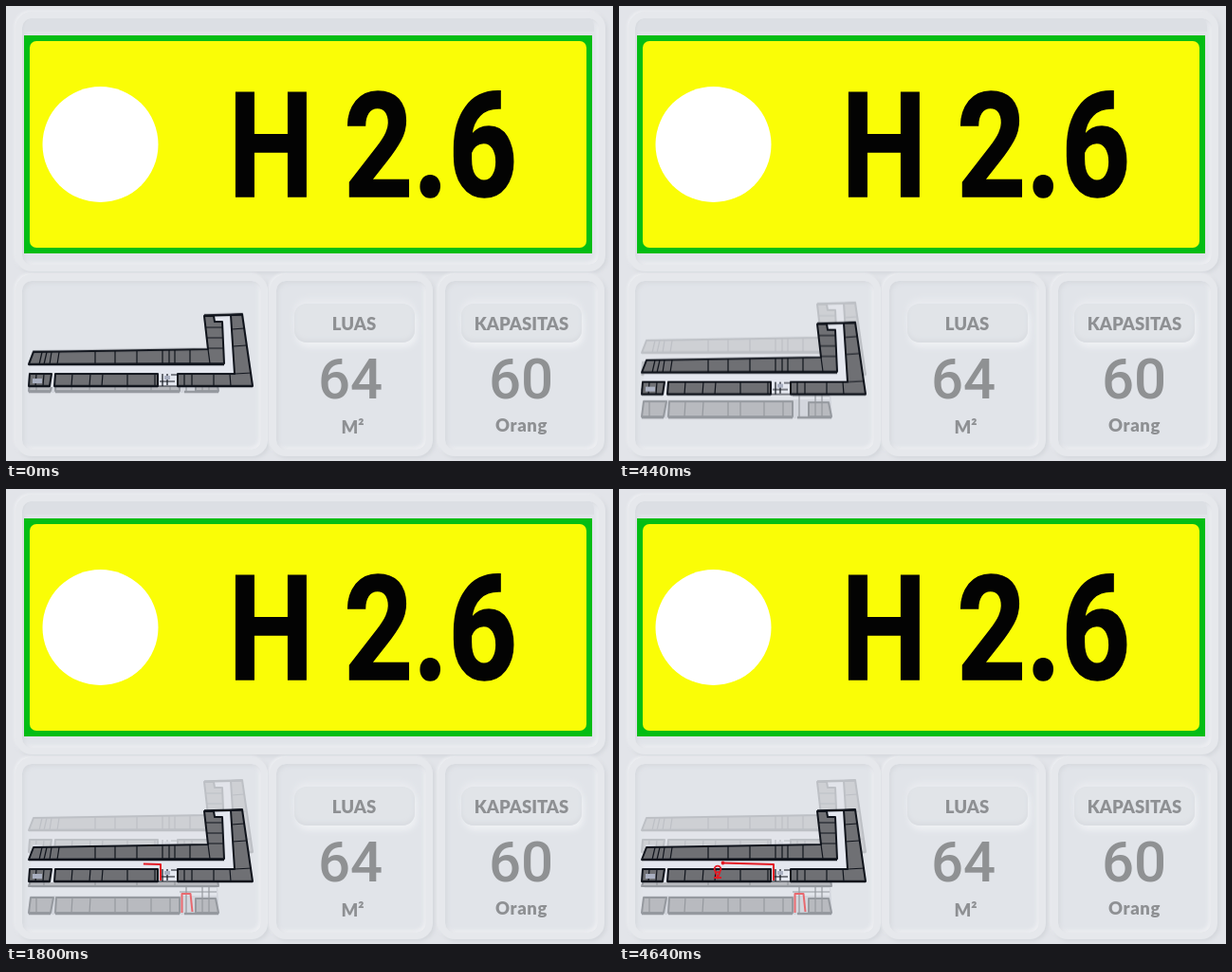
An HTML page for the animation above (5.12 s loop, 640 by 480 pixels).

```html
<!DOCTYPE html>
<html lang="id">
<head>
<meta charset="utf-8">
<title>H 2.6</title>
<style>
  html, body { margin: 0; width: 100%; height: 100%; overflow: hidden; background: #e2e4e9; }
  .stage { position: relative; width: 640px; height: 480px; overflow: hidden; background: #e2e4e9; }
  .stage > * { position: absolute; box-sizing: border-box; }

  .card, .top {
    border: 7px solid #e6e8ec;
    border-radius: 17px;
    background: #e1e4e9;
    box-shadow: 2px 2px 4px #d3d6db, -1px -1px 3px #f1f2f5,
      inset 2px 2px 4px #d6d9de, inset -2px -2px 4px #f0f1f4;
  }
  .top { left: 10px; top: 6px; width: 622px; height: 274px; }
  .band { left: 20px; top: 13px; width: 600px; height: 14px; border-radius: 8px 8px 0 0; background: #dcdfe4; }
  .map { left: 10px; top: 283px; width: 266px; height: 192px; }
  .area { left: 278px; top: 283px; width: 172px; height: 192px; }
  .seats { left: 456px; top: 283px; width: 175px; height: 192px; }

  .pill {
    top: 314px; width: 127px; height: 41px; border-radius: 13px; background: #e1e4e8;
    box-shadow: 2px 5px 6px #eff1f4, 0 -5px 6px #e9ebef, inset 0 -3px 4px #d9dce1;
  }
  .board { left: 19px; top: 31px; width: 599px; height: 230px; background: #04bd14; }
  .board::before { content: ""; position: absolute; inset: 6px; border-radius: 7px; background: #fafd06; }
  svg { left: 0; top: 0; }

  .room { fill: #6f7074; stroke: #10141c; stroke-width: 2; stroke-linejoin: round; }
  .line { fill: none; stroke: #10141c; stroke-width: 1.2; }
  .front { fill: none; stroke: #10141c; stroke-width: 2.6; }
  .hall { fill: #e4e7ef; }
  .slab { fill: #b9bdc8; }
  .route { fill: none; stroke: #e31b25; stroke-width: 2; stroke-linejoin: round; stroke-dasharray: 1; }

  .upper, .main, .lower, .route, .pin { animation: 5120ms linear infinite; }
  .upper { opacity: .17; animation-name: rise; }
  .main { animation-name: sink; }
  .lower { animation-name: drop; }
  .first { stroke: #e8696f; animation-name: first; }
  .second { animation-name: second; }
  .pin { animation-name: pin; }

  /* each move eases out like a sine */
  @keyframes rise {
    0% { transform: translateY(-14px); animation-timing-function: cubic-bezier(.39,.575,.565,1); }
    19.53%, 100% { transform: translateY(-31px); }
  }
  @keyframes sink {
    0% { transform: translateY(-13px); animation-timing-function: cubic-bezier(.39,.575,.565,1); }
    19.53%, 100% { transform: none; }
  }
  @keyframes drop {
    0% { transform: translateY(-41px); animation-timing-function: cubic-bezier(.39,.575,.565,1); }
    19.53%, 100% { transform: none; }
  }
  @keyframes first {
    0%, 11.72% { stroke-dashoffset: 1; animation-timing-function: cubic-bezier(.39,.575,.565,1); }
    19.53%, 100% { stroke-dashoffset: 0; }
  }
  @keyframes second {
    0%, 31.64% { stroke-dashoffset: 1; animation-timing-function: cubic-bezier(.39,.575,.565,1); }
    42.6%, 100% { stroke-dashoffset: 0; }
  }
  @keyframes pin {
    0%, 47.27% { opacity: 0; }
    50%, 100% { opacity: 1; }
  }

  text { text-anchor: middle; }
  .name { font: 700 154px Roboto, sans-serif; text-anchor: start; fill: #030303; stroke: #030303; stroke-width: 1.6; }
  .label { font: 900 18.5px Lato, sans-serif; fill: #8e9093; }
  .value { font: 500 60px Roboto, sans-serif; fill: #8f9193; }
</style>
</head>
<body>
<div class="stage">
  <div class="top"></div>
  <div class="band"></div>
  <div class="card map"></div>
  <div class="card area"></div>
  <div class="card seats"></div>
  <div class="pill" style="left:304px"></div>
  <div class="pill" style="left:480px"></div>
  <div class="board"></div>

  <svg width="640" height="480" viewBox="0 0 640 480">
    <defs>
      <g id="floor">
        <path class="hall" d="M29 377 213 374 209 339 249 338 260 414 23 415Z"/>
        <path class="room" d="M29 378 213 375 209 340 219 340 220 346 228 346 230 390 24 391Z"/>
        <path class="room" d="M237 339 249 338 260 414 181 414 181 401 241 401Z"/>
        <path class="room" d="M52 401H160V414H51Z"/>
        <path class="room" d="M25 401H48L46 414H24Z"/>
        <path class="line" d="M38 378 35 391M43 378 40 391M48 378 46 391M56 378 54 391M94 377V390M115 377V390M138 376V390M165 376V390M172 376V390M178 376V390M194 375V390M213 375 215 390M211 352H228M212 363H229M213 374H229"/>
        <path class="line" d="M70 401 69 414M89 401 88 414M102 401 101 414M128 401V414M157 401V414M188 401V414M196 401V414M219 401V414M236 401 237 414M241 401 259 400M239 372 253 371M238 354 251 353M32 401 31 414M40 401 39 414"/>
        <path class="front" d="M24 391H230M51 414H160M181 414H260M24 414H46M209 339.500 249 338.500"/>
        <path class="line" d="M165 401V414M170 401V413M174 402H181M162 409H178M160 414H181"/>
        <path d="M167 403H173V407H167ZM28 406H38V411H28Z" fill="#a9afc0"/>
      </g>
    </defs>

    <use class="upper" href="#floor"/>

    <g class="lower">
      <g opacity=".36">
        <path class="slab" d="M29 405H222L225 449H23Z"/>
        <path class="room" d="M29 405H222L224 419H24Z"/>
        <path class="hall" d="M25 421H222V429H24Z"/>
        <path class="room" d="M53 431H183V447H52Z"/>
        <path class="room" d="M26 431H50L47 447H24Z"/>
        <path class="room" d="M200 432H221L224 447H200Z"/>
        <path class="line" d="M70 431 69 447M89 431 88 447M115 431V447M128 431V447M153 431V447M173 431V447M207 420V447M214 420V447M190 420V447M32 431V447M183 425H222M40 405V418M94 405V418M138 405V418M178 405V418"/>
        <path class="front" d="M52 448H183M24 448H47M188 448H224"/>
      </g>
      <path class="route first" pathLength="1" d="M185.500 447V427H194.500L196.500 446"/>
    </g>

    <g class="main">
      <use href="#floor"/>
      <path class="route second" pathLength="1" d="M163 413V396L109 394.500"/>
      <g class="pin" fill="none" stroke="#e31b25" stroke-width="1.800">
        <circle cx="104" cy="401" r="3.400"/>
        <path d="M101.500 404 104 410 106.500 404M100 410H108"/>
        <circle cx="109.500" cy="394.500" r="1" fill="#e31b25"/>
      </g>
    </g>

    <circle cx="99.500" cy="146" r="61" fill="#fff"/>
    <text class="name" transform="translate(234.600 200.500) scale(.826 1)">H 2.6</text>

    <text class="label" x="367" y="342">LUAS</text>
    <text class="value" x="363" y="414">64</text>
    <text class="label" x="365.500" y="451">M²</text>
    <text class="label" x="543.500" y="342">KAPASITAS</text>
    <text class="value" x="543" y="414">60</text>
    <text class="label" x="543.500" y="449" letter-spacing=".6">Orang</text>
  </svg>
</div>
</body>
</html>
```
